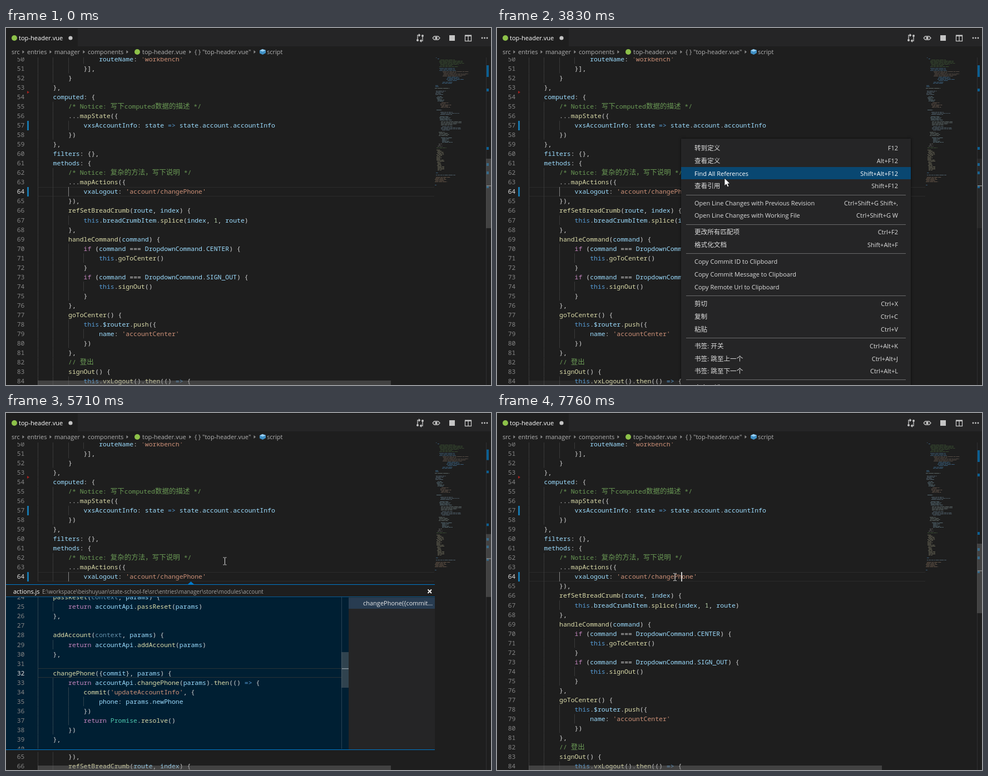
These frames come from a looping animation (872 by 642 pixels, 8000 ms). An HTML page with a canvas:

```html
<!DOCTYPE html>
<html>
<head>
<meta charset="utf-8">
<style>
html, body { margin: 0; width: 100%; height: 100%; overflow: hidden; background: #1e1e1e }
canvas { display: block }
</style>
</head>
<body>
<canvas id="stage" width="872" height="642"></canvas>
<script>
const ctx = document.getElementById('stage').getContext('2d');
const LOOP = 8000, CW = 6.885, LH = 17.03, X0 = 57;
const MONO = '500 11.475px "Noto Sans Mono", "DejaVu Sans Mono", monospace';
const CJK = '12.5px "Noto Sans CJK SC", "Noto Sans CJK", sans-serif';
const ui = size => size + 'px "Open Sans", "Noto Sans CJK SC", "Noto Sans CJK", sans-serif';
const SLIDER = 'rgba(121,121,121,.4)';

const code = `                routeName: 'workbench'
            }],
        }
    },
    computed: {
        /* Notice: 写下computed数据的描述 */
        ...mapState({
            vxsAccountInfo: state => state.account.accountInfo
        })
    },
    filters: {},
    methods: {
        /* Notice: 复杂的方法，写下说明 */
        ...mapActions({
            vxaLogout: 'account/changePhone'
        }),
        refSetBreadCrumb(route, index) {
            this.breadCrumbItem.splice(index, 1, route)
        },
        handleCommand(command) {
            if (command === DropdownCommand.CENTER) {
                this.goToCenter()
            }
            if (command === DropdownCommand.SIGN_OUT) {
                this.signOut()
            }
        },
        goToCenter() {
            this.$router.push({
                name: 'accountCenter'
            })
        },
        // 登出
        signOut() {
            this.vxLogout().then(() => {`.split('\n');

const peekCode = `    passReset(context, params) {
        return accountApi.passReset(params)
    },

    addAccount(context, params) {
        return accountApi.addAccount(params)
    },

    changePhone({commit}, params) {
        return accountApi.changePhone(params).then(() => {
            commit('updateAccountInfo', {
                phone: params.newPhone
            })
            return Promise.resolve()
        })
    },
`.split('\n');

// Menu groups of [label, shortcut]
const menu = [
  [['转到定义', 'F12'], ['查看定义', 'Alt+F12'], ['Find All References', 'Shift+Alt+F12'], ['查看引用', 'Shift+F12']],
  [['Open Line Changes with Previous Revision', 'Ctrl+Shift+G Shift+,'], ['Open Line Changes with Working File', 'Ctrl+Shift+G W']],
  [['更改所有匹配项', 'Ctrl+F2'], ['格式化文档', 'Shift+Alt+F']],
  [['Copy Commit ID to Clipboard', ''], ['Copy Commit Message to Clipboard', ''], ['Copy Remote Url to Clipboard', '']],
  [['剪切', 'Ctrl+X'], ['复制', 'Ctrl+C'], ['粘贴', 'Ctrl+V']],
  [['书签: 开关', 'Ctrl+Alt+K'], ['书签: 跳至上一个', 'Ctrl+Alt+J'], ['书签: 跳至下一个', 'Ctrl+Alt+L']],
  [['命令面板...', 'Ctrl+Shift+P']]
];

// Pointer path: time, x, y
const path = [
  [200, 781, 515], [300, 650, 330], [400, 520, 178], [590, 418, 304], [980, 418, 304],
  [1530, 324, 294], [1900, 324, 294], [2250, 437, 183], [2670, 347, 281], [2750, 345, 284],
  [2820, 335, 299], [2990, 335, 299], [3050, 331, 293], [3280, 331, 293], [3550, 385, 284],
  [3830, 409, 270], [4060, 407, 240], [5400, 407, 240], [5710, 394, 266], [6150, 135, 455],
  [6350, 91, 467], [6850, 263, 510], [7000, 200, 570], [7160, 140, 590], [7300, 150, 580],
  [7620, 320, 295], [8000, 320, 295]
];

const within = (t, a, b) => t >= a && t < b;
const clamp01 = v => Math.min(1, Math.max(0, v));

function pointer(t) {
  let i = 1;
  while (i < path.length - 1 && path[i][0] < t) i++;
  const [ta, xa, ya] = path[i - 1], [tb, xb, yb] = path[i];
  const k = clamp01((t - ta) / (tb - ta));
  return { x: xa + (xb - xa) * k, y: ya + (yb - ya) * k };
}

function box(x, y, w, h, color) {
  ctx.fillStyle = color;
  ctx.fillRect(x, y, w, h);
}

function text(str, x, y, color, font = ui(11), align = 'left') {
  ctx.font = font;
  ctx.textAlign = align;
  ctx.fillStyle = color;
  ctx.fillText(str, x, Math.round(y));
}

function disc(x, y, r, color) {
  ctx.fillStyle = color;
  ctx.beginPath();
  ctx.arc(x, y, r, 0, 7);
  ctx.fill();
}

function line(points, color, width = 1) {
  ctx.strokeStyle = color;
  ctx.lineWidth = width;
  ctx.beginPath();
  for (let i = 0; i < points.length; i += 2) ctx.lineTo(points[i], points[i + 1]);
  ctx.stroke();
}

function shape(points, color) {
  ctx.fillStyle = color;
  ctx.beginPath();
  for (let i = 0; i < points.length; i += 2) ctx.lineTo(points[i], points[i + 1]);
  ctx.fill();
}

const tokens = /\/\*.*?\*\/|\/\/.*|'[^']*'|=>|[\w$]+|\s+|[^\w\s$]/g;

function tokenColor(token, next, dim) {
  if (/^\/[*\/]/.test(token)) return '#6a9955';
  if (token[0] == "'") return '#ce9178';
  if (/^(this|=>)$/.test(token)) return '#569cd6';
  if (/^(if|return)$/.test(token)) return '#c586c0';
  if (token == 'Promise') return '#4ec9b0';
  if (dim && token == 'context') return '#6592ac';
  if (/^\d/.test(token)) return '#b5cea8';
  if (/^[\w$]/.test(token)) return next == '(' ? '#dcdcaa' : '#9cdcfe';
  return '#d4d4d4';
}

function codeLine(str, mid, dim) {
  let x = X0;
  for (const m of str.matchAll(tokens)) {
    const color = tokenColor(m[0], str[m.index + m[0].length], dim);
    for (const run of m[0].match(/[\x00-\xff]+|[^\x00-\xff]+/g)) {
      const wide = run.charCodeAt(0) > 255;
      if (run.trim()) text(run, x, mid + 4, color, wide ? CJK : MONO);
      x += run.length * (wide ? 12.5 : CW);
    }
  }
}

function guides(str, mid, color, activeCol) {
  const indent = Math.max(1, str.search(/\S/));
  for (let c = 0; c < indent; c += 4)
    box(Math.floor(X0 + c * CW), mid - LH / 2, 1, LH, c === activeCol ? '#858585' : color);
}

function lineNumber(n, mid, active) {
  text(n, 33.5, mid + 4, active ? '#e0e0e0' : '#858585', MONO, 'right');
}

function caret(col, mid) {
  box(Math.round(X0 + col * CW) - 1, Math.round(mid - 8.5), 2, 17, '#c8c8c6');
}

// Minimap blocks: top, bottom, left, widest, colour
const mapBlocks = [
  [53, 54, 771, 8, '#4a84b0'], [55, 56, 774, 9, '#4a84b0'], [57, 70, 779, 47, '#48683c'],
  [72, 77, 779, 36, '#4a7798'], [78, 88, 785, 50, '#77685c'], [88, 96, 792, 44, '#4a84b0'],
  [97, 101, 783, 20, '#4a84b0'], [103, 106, 771, 8, '#4a84b0'], [108, 110, 771, 40, '#81918f'],
  [113, 120, 771, 21, '#6d8798'], [123, 133, 774, 16, '#7899a8'], [134, 144, 781, 20, '#8a7564'],
  [147, 149, 774, 10, '#7899a8'], [151, 157, 781, 46, '#6d8798'], [159, 166, 778, 26, '#7899a8'],
  [168, 175, 780, 40, '#7d8e90'], [177, 185, 782, 38, '#6d8798'], [187, 194, 778, 22, '#81918f'],
  [197, 206, 782, 22, '#7899a8'], [208, 214, 776, 9, '#7c7c7c'], [215, 217, 774, 24, '#55754a'],
  [219, 257, 774, 15, '#96937a'], [260, 262, 771, 7, '#4a84b0'], [264, 266, 771, 42, '#6b8798'],
  [268, 277, 771, 30, '#8d7560'], [282, 284, 771, 7, '#4a84b0']
];

function minimap() {
  let seed = 7;
  const rnd = () => (seed = seed * 16807 % 2147483647) / 2147483647;
  ctx.globalAlpha = .62;
  for (const [top, bottom, left, widest, color] of mapBlocks)
    for (let y = top; y < bottom; y += 2) {
      const end = left + widest * (.4 + .6 * rnd());
      for (let x = left + Math.floor(rnd() * 3); x < end;) {
        const w = 2 + rnd() * 7;
        box(x, y, Math.min(w, end - x), 1, color);
        x += w + 1;
      }
    }
  ctx.globalAlpha = 1;
}

function ruler(scale, fade) {
  const at = y => 53 + (y - 53) * scale;
  box(863, 53, 1, 589, '#303031');
  for (const [a, b] of [[67, 88], [109, 114], [214, 219], [243, 248], [258, 263], [283, 288]])
    box(864, at(a), 4, (b - a) * scale, '#0b5f93');
  box(864, at(283), 8, 1.5, '#8a8a8a');
  ctx.globalAlpha = fade;
  box(863, at(235), 9, 125 * scale, SLIDER);
  box(X0, 634, 635, 8, SLIDER);
  ctx.globalAlpha = 1;
}

function header() {
  const pale = '#c5c5c5', crumb = '#b2b2b2', green = '#8dc149';
  box(0, 0, 872, 33, '#252526');
  box(0, 0, 129, 33, '#1e1e1e');
  box(0, 0, 872, 1, '#1b1b1b');
  box(0, 33, 872, 20, '#1e1e1e');
  disc(15, 18, 5, green);
  text('top-header.vue', 23, 22, '#ffffff', ui(11.1));
  disc(116, 18, 3.6, pale);

  // compare, revision, repository, split and overflow buttons
  line([744, 13, 740, 13, 740, 21], pale, 1.3);
  line([745, 23, 749, 23, 749, 15], pale, 1.3);
  shape([742, 10, 745.5, 13, 742, 16], pale);
  shape([747, 20, 743.5, 23, 747, 26], pale);
  disc(740, 22, 2, pale);
  disc(749, 14, 2, pale);
  line([767, 18, 770, 15, 777, 15, 780, 18, 777, 21, 770, 21, 767, 18], pale, 1.4);
  disc(773.5, 18, 2.2, pale);
  box(797, 13, 10, 10, pale);
  ctx.strokeStyle = pale;
  ctx.lineWidth = 1.3;
  ctx.strokeRect(825.5, 13.5, 11, 10);
  box(825, 12.5, 12, 2.5, pale);
  box(830.4, 13, 1.3, 10, pale);
  for (const x of [856, 860.5, 865]) disc(x, 18, 1.4, pale);

  for (const [str, x] of [['src', 10], ['entries', 38], ['manager', 87], ['components', 147],
    ['top-header.vue', 245], ['{ }', 339], ['"top-header.vue"', 353], ['script', 469]])
    text(str, x, 47, crumb);
  for (const x of [31, 80, 140, 218, 331, 447])
    shape([x - 1.5, 40, x + 2, 43, x - 1.5, 46], '#8c8c8c');
  disc(236, 43, 5, green);
  shape([456, 40.5, 461, 38, 467, 40, 467, 45, 461.5, 48, 456, 45.5], '#3f8fc4');
  shape([456, 40.5, 461, 38, 467, 40, 461.5, 42.5], '#9ad0f2');
}

function editor(t, peek) {
  for (let i = 0; i < code.length; i++) {
    const n = 50 + i, mid = 56 + LH * i + (peek && n > 64 ? 18 * LH : 0);
    if (mid > 655) break;
    if (n == 64) {
      box(X0, 286, 713, 1, '#2b2b2b');
      box(X0, 302, 713, 1, '#2b2b2b');
    }
    guides(code[i], mid, '#393939', n == 64 ? 8 : -1);
    lineNumber(n, mid, n == 64);
    codeLine(code[i], mid);
    if (n == 57 || n == 64) box(38, Math.round(mid - 8.5), 3, 17, '#1677ad');
  }
  shape([38, 113, 42, 115.5, 38, 118], '#a3231f');
  const mid = 56 + LH * 14;
  if (within(t, 1180, 4600))
    text('You, a few seconds ago • Uncommitted changes', 404, mid + 4, '#505050', MONO);
  if (within(t, 1180, 1680) || within(t, 2180, 2670)) caret(44, mid);
  if (within(t, 3050, 4600) || t >= 7760) caret(40, mid);
}

function peekView(t) {
  const blue = '#007acc', loaded = t >= 4680, picked = t >= 6350;
  const midOf = n => 348.4 + LH * (n - 25);
  box(0, 303, 771, 306, '#1e1e1e');
  shape([326, 309, 332.5, 303, 339, 309], blue);
  box(0, 331, 616, 274, '#001f33');
  box(616, 331, 155, 274, '#252526');
  box(0, 308, 771, 1, blue);
  box(0, 330, 771, 1, '#075b94');
  text('actions.js', 13, 325, '#ffffff');
  text('E:\\workspace\\beishuyuan\\state-school-fe\\src\\entries\\manager\\store\\modules\\account',
    65, 325, '#a2a2a2', ui(9.9));
  line([758.5, 317.5, 765, 324], '#ffffff', 1.8);
  line([765, 317.5, 758.5, 324], '#ffffff', 1.8);

  if (loaded) {
    box(616, 332, 155, 20, picked ? '#37373d' : '#283c51');
    text('changePhone({commit...', 642, 346, '#e8e8e8');
    ctx.save();
    ctx.beginPath();
    ctx.rect(0, 331, 616, 273);
    ctx.clip();

    let row = 32, col = 4;
    if (picked) {
      const p = pointer(Math.max(6350, Math.min(t - 35, 7160)));
      row = Math.max(32, Math.min(40, 32 + Math.floor((p.y - midOf(32) + LH / 2) / LH)));
      col = Math.min(peekCode[row - 24].length, Math.round((p.x - X0) / CW));
      for (let n = 32; n <= row; n++) {
        const from = n == 32 ? 5 : 0, to = n == row ? col : peekCode[n - 24].length + 1;
        box(X0 + from * CW, midOf(n) - LH / 2, (to - from) * CW, LH + .1, '#264f78');
      }
    } else {
      box(X0, 459, 546, 1, '#283236');
      box(X0, 475, 546, 1, '#283236');
    }
    peekCode.forEach((str, i) => {
      const mid = midOf(24 + i);
      guides(str, mid, '#30434f');
      lineNumber(24 + i, mid, 24 + i == row);
      codeLine(str, mid, t >= 4970);
    });
    if (picked) caret(col, midOf(row));
    box(603, 331, 1, 274, '#2a4354');
    if (t >= 5160) box(603, 430, 13, 64, SLIDER);
    box(604, 459 + (row - 32) * 3.5, 12, 1.5, '#85929a');
    ctx.restore();
  }
  box(0, 605, 771, 1, blue);
}

function contextMenu(p) {
  ctx.save();
  ctx.shadowColor = 'rgba(0,0,0,.7)';
  ctx.shadowBlur = 4;
  box(331, 199, 413, 460, '#252526');
  ctx.restore();
  let y = 216;
  for (const group of menu) {
    for (const [label, keys] of group) {
      const hover = p.x > 331 && Math.abs(p.y - y) < 11.4;
      if (hover) box(331, Math.round(y - 11.5), 413, 22, '#094771');
      const color = hover ? '#ffffff' : '#dedede';
      text(label, 355, y + 4, color, ui(label.charCodeAt(0) > 255 ? 11.6 : 11));
      text(keys, 721, y + 4, color, ui(11), 'right');
      y += 22.8;
    }
    box(340, Math.round(y - 7.6), 395, 1, '#6a6a6b');
    y += 7.3;
  }
}

function drawPointer(p, arrow) {
  const { x, y } = p;
  if (arrow) {
    const tip = [0, 0, 0, 14, 3.3, 11, 5.5, 16, 8, 15, 5.8, 10.2, 10, 10, 0, 0]
      .map((v, i) => v + (i % 2 ? y : x));
    shape(tip, '#ffffff');
    line(tip, '#111111', .8);
    return;
  }
  box(x - .5, y - 6, 1.1, 12, '#d4d4d4');
  for (const dy of [-7, 6]) {
    box(x - 3, y + dy, 2.5, 1, '#d4d4d4');
    box(x + .5, y + dy, 2.5, 1, '#d4d4d4');
  }
}

function draw(t) {
  const peek = within(t, 4600, 7760), open = within(t, 3280, 4370), p = pointer(t);
  // scrollbars fade out under the menu and return when it closes
  const fade = t < 4370 ? clamp01(1 - (t - 3280) / 780) : clamp01((t - 4320) / 220);
  box(0, 0, 872, 642, '#1e1e1e');
  editor(t, peek);
  if (peek) peekView(t);
  minimap();
  ruler(peek ? .905 : 1, fade);
  header();
  if (open) contextMenu(p);
  if (within(t, 3050, 3280) || within(t, 4290, 4370) || within(t, 6350, 7200))
    disc(p.x - 1, p.y - 1, 11, 'rgba(207,192,0,.82)');
  if (t >= 200) drawPointer(p, open || p.x > 770 || (peek && within(p.y, 309, 331)));
}

function frame(now) {
  draw(now % LOOP);
  requestAnimationFrame(frame);
}
requestAnimationFrame(frame);
</script>
</body>
</html>
```
